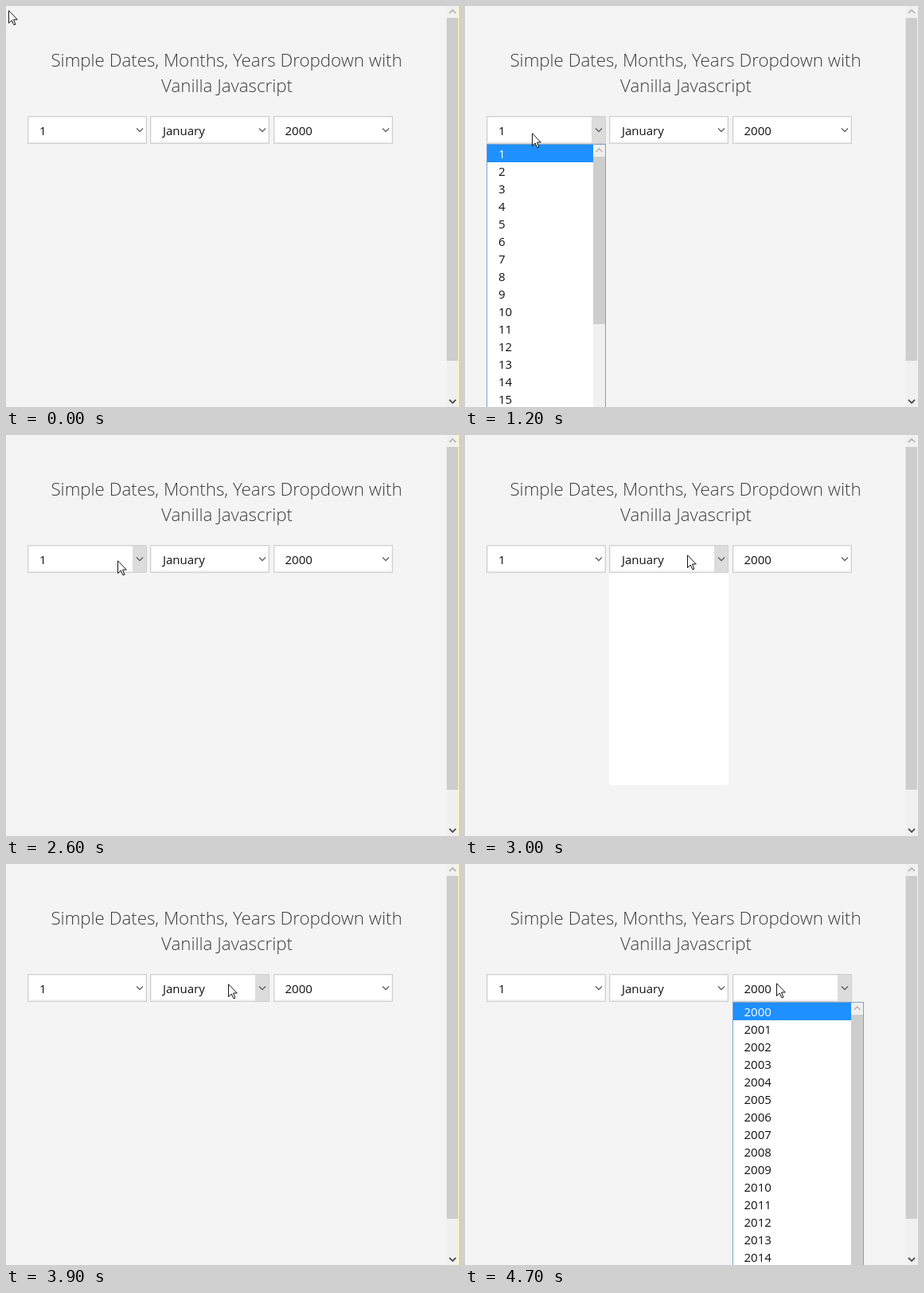
Animation, 569 px wide and 503 px high, one loop 5000 ms. Source, as an HTML page:

```html
<!DOCTYPE html>
<html lang="en">
<head>
<meta charset="utf-8">
<title>Date dropdowns</title>
<style>
  html, body { margin: 0; width: 100%; height: 100%; overflow: hidden; background: #f4f4f4; }
  svg { display: block; }
  text { font-family: "Open Sans", "Noto Sans", sans-serif; }
  .title { font-size: 22.3px; font-weight: 300; fill: #3c3c3c; text-anchor: middle; }
  .label { font-size: 15px; }
</style>
</head>
<body>
<svg id="stage" width="569" height="503" viewBox="0 0 569 503"></svg>
<script>
const LOOP = 5000;
const ROW = 22;
const LIST_TOP = 173;
const stage = document.getElementById('stage');

function add(parent, tag, attrs, content) {
  const node = document.createElementNS('http://www.w3.org/2000/svg', tag);
  for (const key in attrs) node.setAttribute(key, attrs[key]);
  if (content !== undefined) node.textContent = content;
  parent.appendChild(node);
  return node;
}

const rect = (parent, x, y, width, height, fill) =>
  add(parent, 'rect', { x, y, width, height, fill });

const label = (parent, x, y, content, fill = '#111') =>
  add(parent, 'text', { x, y, fill, class: 'label' }, content);

// dir is 1 for a chevron pointing down, -1 for up
const chevron = (parent, x, y, dir, stroke, width = 1.3) =>
  add(parent, 'path', {
    d: `M${x - 4} ${y - 2 * dir}l4 ${4 * dir}l4 ${-4 * dir}`,
    fill: 'none', stroke, 'stroke-width': width
  });

const show = (node, visible) => node.setAttribute('visibility', visible ? 'visible' : 'hidden');

function buildPage() {
  rect(stage, 0, 0, 569, 503, '#f4f4f4');
  add(stage, 'text', { x: 277, y: 76, class: 'title' }, 'Simple Dates, Months, Years Dropdown with');
  add(stage, 'text', { x: 277.5, y: 108, class: 'title' }, 'Vanilla Javascript');
  rect(stage, 553.5, 0, 14.5, 503, '#f0f0f0');
  rect(stage, 553.5, 15, 14.5, 430, '#cdcdcd');
  rect(stage, 568, 0, 1, 503, '#fdfba8');
  chevron(stage, 561, 7, -1, '#b8b8b8', 1.8);
  chevron(stage, 561, 496, 1, '#505050', 1.8);
}

function buildSelect({ x, textX, items, listWidth = 150, thumb = 0 }) {
  rect(stage, x, 138, 150, 35, '#cfcfcf');
  rect(stage, x + 1, 139, 148, 33, '#f0f0f0');
  rect(stage, x + 2, 140, 146, 30, '#fff');
  const button = rect(stage, x + 132, 139, 17, 33, '#dcdcdc');
  chevron(stage, x + 141, 155.5, 1, '#606060');
  label(stage, textX, 162, items[0]);

  const height = items.length * ROW + 2;
  const blank = add(stage, 'rect', { x, y: LIST_TOP, width: 150, height, rx: 3, fill: '#fff' });
  const list = add(stage, 'g', {});
  rect(list, x, LIST_TOP, listWidth, height, '#7c9fc9');
  rect(list, x + 1, LIST_TOP + 1, listWidth - 2, height - 2, '#fff');
  const barX = x + listWidth - 16;
  const rowWidth = thumb ? listWidth - 17 : listWidth - 2;
  rect(list, x + 1, LIST_TOP + 1, rowWidth, ROW, '#1e90ff');
  if (thumb) {
    rect(list, barX, LIST_TOP + 1, 15, height - 2, '#f0f0f0');
    rect(list, barX, 189, 15, thumb, '#cdcdcd');
    chevron(list, barX + 7.5, 181, -1, '#b0b0b0');
  }
  items.forEach((item, i) => label(list, textX, 191 + i * ROW, item, i ? '#111' : '#fff'));
  return { x, button, blank, list };
}

const range = (from, count) => Array.from({ length: count }, (_, i) => from + i);
const months = ['January', 'February', 'March', 'April', 'May', 'June', 'July',
  'August', 'September', 'October', 'November', 'December'];

buildPage();
const [day, month, year] = [
  { x: 27, textX: 42, items: range(1, 20), thumb: 210 },
  { x: 181, textX: 197, items: months },
  { x: 336, textX: 350.5, items: range(2000, 20), listWidth: 165, thumb: 330 }
].map(buildSelect);
show(day.blank, false);
show(year.blank, false);

const cursor = add(stage, 'path', {
  d: 'M.5 .8V16.5L4.2 13L6.7 18.5H8.5V17L6.5 12H11.3Z',
  fill: '#fff', stroke: '#111', 'stroke-width': 1
});

// [time, x, y] of each pointer jump
const pointerStops = [
  [0, 3, 5], [600, 58, 104], [700, 84, 159],
  [2600, 140, 157], [2700, 235, 152], [2800, 279, 150],
  [4000, 345, 150], [4100, 391, 149]
];

function render(t) {
  const [, px, py] = pointerStops.filter(stop => stop[0] <= t).pop();
  cursor.setAttribute('transform', `translate(${px} ${py})`);

  for (const { x, button } of [day, month, year]) {
    show(button, px >= x && px < x + 150 && py >= 138 && py < 173);
  }
  show(day.list, t >= 1200 && t < 2100);
  show(month.blank, t >= 3000 && t < 3200);
  show(month.list, t >= 3200 && t < 3900);
  show(year.list, t >= 4500);
}

function tick() {
  render(performance.now() % LOOP);
  requestAnimationFrame(tick);
}
tick();
</script>
</body>
</html>
```
